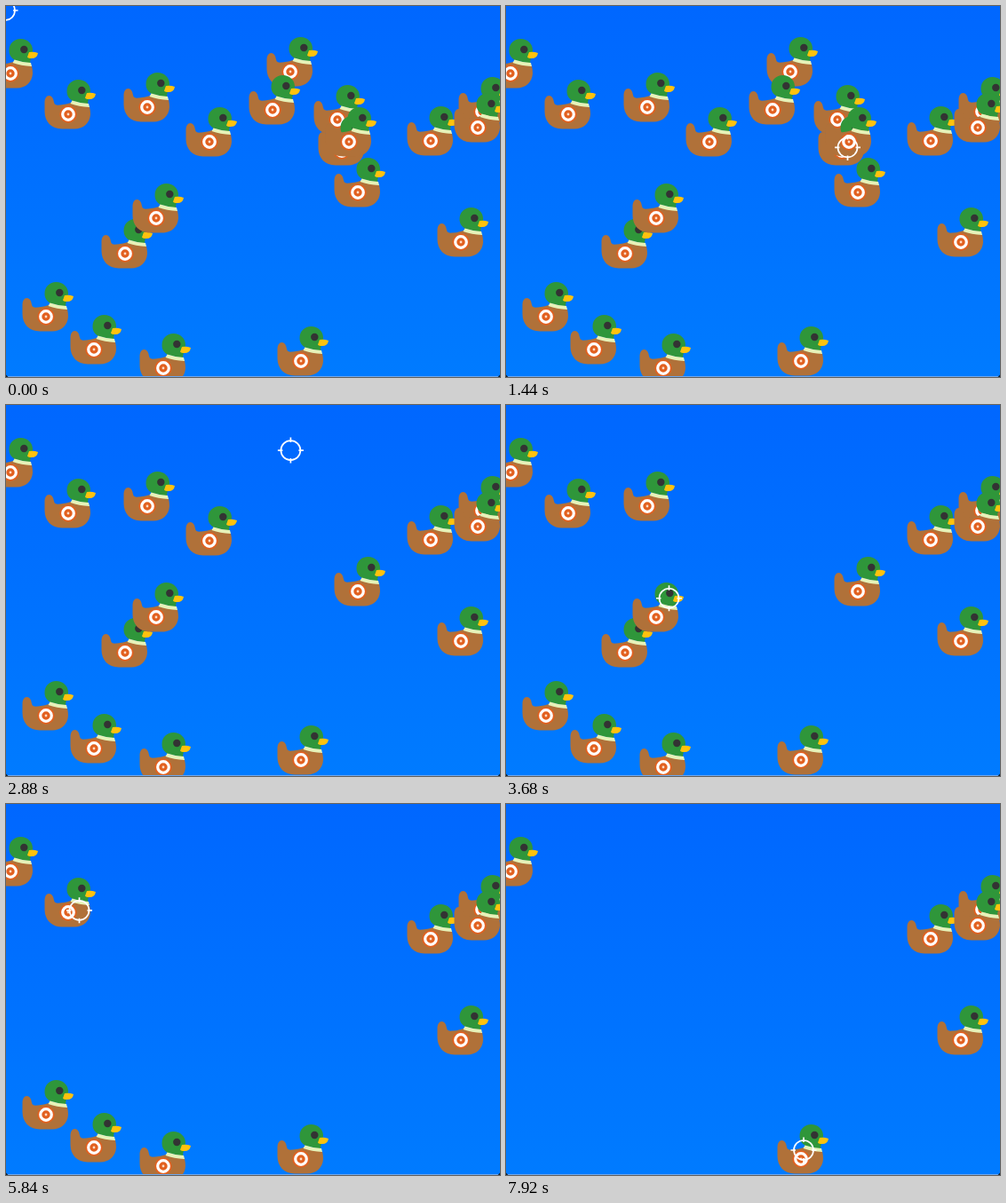
These frames come from a looping animation (556x418 px, 8000 ms). An HTML page:

```html
<!DOCTYPE html>
<html lang="en">
<head>
<meta charset="utf-8">
<title>Duck shooting</title>
<style>
  html, body { margin: 0; width: 100%; height: 100%; overflow: hidden; background: #0070ff; }
  svg { display: block; width: 100vw; height: 100vh; }
</style>
</head>
<body>
<svg viewBox="0 0 556 418" preserveAspectRatio="none">
  <defs>
    <linearGradient id="sky" x1="0" y1="0" x2="0" y2="1">
      <stop offset="0" stop-color="#0067ff"/>
      <stop offset="1" stop-color="#007bff"/>
    </linearGradient>
    <!-- Origin is the centre of the bullseye -->
    <g id="duck">
      <path fill="#b07139" d="M-26.500 -13C-26.500 -18 -24.500 -21 -21.500 -21C-18 -21 -16.500 -17 -16 -13.500C-15.500 -10.500 -13 -10 -9 -10.500C-4 -11 0 -12 3 -13L24 -8.500Q25 -4 25 0C24.500 10 17 16.500 7 16.500H-7C-19 16.500 -26.500 8 -26.500 -3Z"/>
      <path fill="#2f963a" d="M5 -15C0 -18 -1.500 -22 -1.500 -26C-1.500 -33.500 4 -39 11.500 -39C19 -39 25 -33.500 25 -26.500C25 -21 22.500 -19 22 -11Z"/>
      <path fill="#e6f2b8" d="M4.500 -15.500Q13 -12.500 23 -12L24 -8Q12 -8.500 2.500 -12Z"/>
      <path fill="#ffc20e" d="M21 -24Q26 -25 31 -23Q30 -17 24 -17Q20 -17 19 -18.500Z"/>
      <circle cx="15.300" cy="-27" r="4.200" fill="#333"/>
      <circle r="9.700" fill="#e2601f"/>
      <circle r="6.300" fill="none" stroke="#fff" stroke-width="3.200"/>
      <circle r="1.400" fill="#ffdcc4"/>
    </g>
  </defs>
  <rect width="556" height="418" fill="url(#sky)"/>
  <g id="flock"></g>
  <g id="sight" fill="none" stroke="#fff" stroke-width="1.700">
    <circle r="11"/>
    <path d="M0 -14.500V-9M0 14.500V9M-14.500 0H-9M14.500 0H9"/>
  </g>
  <path stroke="#6fa6ea" d="M0 417.500H556"/>
  <path fill="#123" d="M0 415.500V418H2.500ZM556 415.500V418H553.500Z"/>
</svg>
<script>
const LOOP = 8000, STEP = 80;
const START = 500, DWELL = 80, HOP = 266, PER_PIXEL = 1.6;
const HOME = { x: -1, y: 5 };

// Both lists run front to back; prey is also in the order of the shots
const prey = [
  [386, 153], [378, 163], [373, 128], [300, 117], [320, 74],
  [229, 153], [169, 239], [134, 279], [396, 210], [159, 114],
  [70, 122], [45, 350], [99, 387], [177, 408], [332, 400]
];
const survivors = [[531, 137], [536, 119], [478, 152], [512, 266], [5, 76]];

const flock = document.getElementById("flock");
const sight = document.getElementById("sight");

function addDuck([x, y]) {
  const use = document.createElementNS("http://www.w3.org/2000/svg", "use");
  use.setAttribute("href", "#duck");
  use.setAttribute("x", x);
  use.setAttribute("y", y);
  flock.prepend(use);
  return use;
}

// The aim circles round each duck's neck and tightens with every shot
function aimFor([x, y], i) {
  const angle = (i - 2) * Math.PI / 6, r = 19 - i;
  return { x: x + 8 - r * Math.cos(angle), y: y - 10 - r * Math.sin(angle) };
}

// Longer glides take longer
let from = HOME, clock = START;
const shots = prey.map((duck, i) => {
  const to = aimFor(duck, i), leave = clock + DWELL;
  clock += HOP + PER_PIXEL * Math.hypot(to.x - from.x, to.y - from.y);
  const shot = { from, to, leave, arrive: clock, sprite: addDuck(duck) };
  from = to;
  return shot;
});
survivors.forEach(addDuck);

const ease = p => p * p * (3 - 2 * p);
const mix = (a, b, p) => a + (b - a) * p;

function render(t) {
  const next = shots.findIndex(s => t < s.arrive + DWELL);
  const current = next < 0 ? shots.length - 1 : next;
  shots.forEach((s, i) => {
    s.sprite.style.display = i < current ? "none" : "";
  });
  const { from, to, leave, arrive } = shots[current];
  const p = ease(Math.min(1, Math.max(0, (t - leave) / (arrive - leave))));
  sight.setAttribute("transform", `translate(${mix(from.x, to.x, p)} ${mix(from.y, to.y, p)})`);
}

function tick() {
  const t = performance.now() % LOOP;
  render(Math.floor(t / STEP) * STEP);
  requestAnimationFrame(tick);
}
tick();
</script>
</body>
</html>
```
